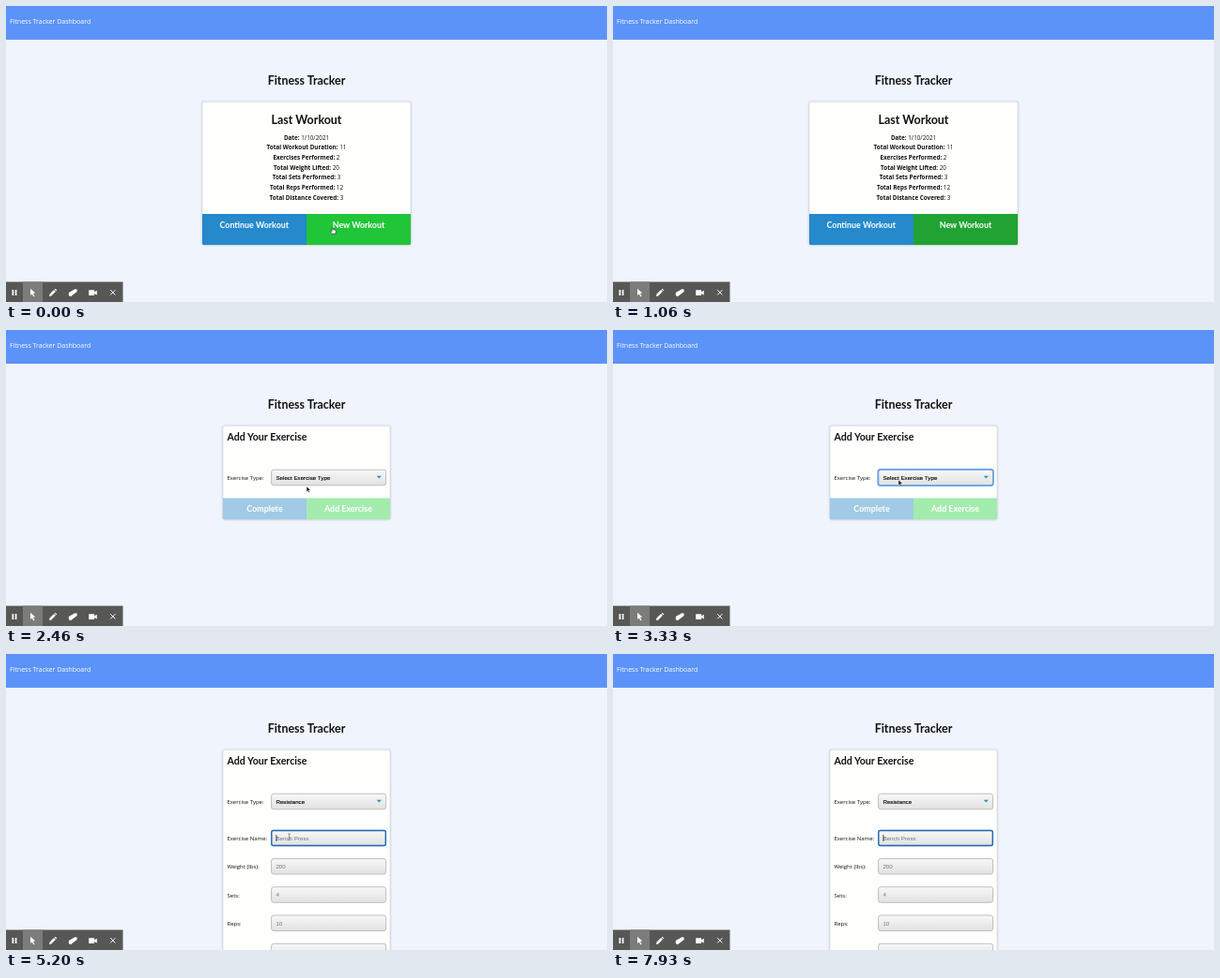
These frames come from a looping animation (640x316 px, 8000 ms). An HTML page:

```html
<!DOCTYPE html>
<html lang="en">
<head>
<meta charset="utf-8">
<title>Fitness Tracker</title>
<style>
  html, body { margin: 0; width: 100%; height: 100%; overflow: hidden; background: #f0f4fc; }
  svg { display: block; width: 100vw; height: 100vh; }
  text { font: 6px "Open Sans", "Noto Sans", sans-serif; fill: #111; white-space: pre; }
  .mid { text-anchor: middle; }
  .row { font-size: 6.3px; }
  .row tspan { font-weight: 700; }
  .h1, .h2, .btn { font: 700 12.44px Lato, sans-serif; }
  .h2 { font-size: 10.66px; }
  .btn { font-size: 8.89px; fill: #fff; }
  .field { font: 6.22px "Liberation Sans", Arial, sans-serif; fill: #757575; }
  .pick { fill: #000; stroke: #000; stroke-width: .12px; }
  .card { fill: #fefffd; stroke: #d3d6da; stroke-width: .6px; filter: drop-shadow(0 .7px .8px #0003); }
  .box { fill: url(#shade); stroke: #b0b0b0; stroke-width: .8px; }
  .ring { fill: none; stroke: #64a4e6; stroke-width: 1.8px; }
  .edge { fill: none; stroke: #1c69b8; stroke-width: 1.4px; }
</style>
</head>
<body>
<svg viewBox="0 0 640 316" preserveAspectRatio="none">
  <defs>
    <linearGradient id="shade" x2="0" y2="1">
      <stop stop-color="#f8f8f8"/><stop offset="1" stop-color="#e0e1e0"/>
    </linearGradient>
  </defs>
  <rect width="640" height="316" fill="#f0f4fc"/>
  <rect width="640" height="36" fill="#5b93f8"/>
  <text x="4" y="18.7" style="font-size:7px;fill:#fff">Fitness Tracker Dashboard</text>
  <text class="h1 mid" x="320" y="84">Fitness Tracker</text>

  <g id="last">
    <rect class="card" x="209" y="102.3" width="222" height="152.7" rx="2"/>
    <text class="h1 mid" x="320" y="126">Last Workout</text>
    <g id="stats"></g>
    <path d="M209 222h111v33h-109.5q-1.500 0-1.500-1.500z" fill="#2589cc"/>
    <path id="start" d="M320 222h111v31.500q0 1.500-1.500 1.500h-109.500z"/>
    <text class="btn mid" x="264.3" y="237">Continue Workout</text>
    <text class="btn mid" x="375.5" y="237">New Workout</text>
  </g>

  <g id="add">
    <rect id="sheet" class="card" x="231" y="102.3" width="178" rx="2"/>
    <text class="h2" x="235.500" y="117.500">Add Your Exercise</text>
    <text x="235.500" y="159.600">Exercise Type:</text>
    <rect class="box" x="282.600" y="149.200" width="122" height="16.600" rx="2.500"/>
    <text id="type" class="field pick" x="287.400" y="159.600"></text>
    <path d="M394.700 155.700h5.200l-2.600 2.900z" fill="#2493c4"/>
    <rect id="typeRing" class="ring" x="282.300" y="148.900" width="122.600" height="17.200" rx="2.500"/>
    <g id="actions">
      <path d="M231 179.500h89v22.700h-87.500q-1.500 0-1.500-1.500z" fill="#a1cae6"/>
      <path d="M320 179.500h89v21.200q0 1.500-1.500 1.500h-87.500z" fill="#a3ecad"/>
      <text class="btn mid" x="275.500" y="194.200">Complete</text>
      <text class="btn mid" x="364.500" y="194.200">Add Exercise</text>
    </g>
    <g id="fields"></g>
    <g id="nameFocus">
      <rect class="edge" x="282.800" y="188.500" width="121.500" height="16" rx="1.500"/>
      <path id="caret" d="M287.900 193v7" stroke="#111" stroke-width=".7"/>
    </g>
  </g>

  <rect y="294.500" width="124.500" height="21.500" fill="#575755"/>
  <rect x="18" y="294.500" width="21" height="21.500" fill="#7c7c7a"/>
  <g fill="#fff">
    <path d="M6.500 303h1.700v6h-1.700zM9.700 303h1.700v6h-1.700z"/>
    <path d="M26 301.800l5.300 4.600-2.400.3 1.500 3-1.300.6-1.400-3-1.700 1.600z"/>
    <path d="M46 309.900l.5-2.300 4.600-4.600 1.800 1.800-4.600 4.600zM51.700 302.400l.8-.7 1.800 1.800-.8.700z"/>
    <path d="M66.800 306l6.500-3.700 2.300.1v2.700l-6.500 4.900-2.300-.7z"/>
    <path d="M88.200 303.300h5.900v1.900l2.700-1.500v4.800l-2.700-1.500v1.900h-5.900z"/>
    <path d="M111.200 303.200l5.200 5.200m0-5.200l-5.200 5.200" stroke="#fff" stroke-width="1"/>
  </g>

  <g id="cursor">
    <path id="hand" d="M-.7-3q.8-.7 1.200.3v1.500l2.400.5q.7.300.5 1.300l-.6 2.700h-3.600l-2-2.600q.2-1 1.200-.4l.6.500z" fill="#fff" stroke="#222" stroke-width=".6"/>
    <path id="arrow" d="M0 0v5.600l1.300-1.200.9 2 1-.5-.9-1.900h1.800z" fill="#111" stroke="#fff" stroke-width=".35"/>
    <path id="beam" d="M-1.300-3.500q1.300 0 1.300 1v5q0 1-1.300 1m2.600-7q-1.300 0-1.300 1m0 5q0 1 1.300 1" fill="none" stroke="#555" stroke-width=".6"/>
  </g>
</svg>
<script>
const $ = id => document.getElementById(id);
const show = (id, on) => $(id).style.display = on ? "" : "none";

$("stats").innerHTML = [
  ["Date", "1/10/2021"], ["Total Workout Duration", 11], ["Exercises Performed", 2],
  ["Total Weight Lifted", 20], ["Total Sets Performed", 3],
  ["Total Reps Performed", 12], ["Total Distance Covered", 3]
].map(([name, value], i) =>
  `<text class="row mid" x="320" y="${142.7 + i * 10.67}"><tspan>${name}</tspan><tspan style="font-weight:700">:</tspan> ${value}</text>`
).join("");

$("fields").innerHTML = [
  ["Exercise Name:", "Bench Press"], ["Weight (lbs):", 200], ["Sets:", 4], ["Reps:", 10], ["Duration:", ""]
].map(([label, hint], i) => {
  const y = 188.2 + i * 30.25;
  return `<text x="235.5" y="${y + 10.9}">${label}</text>
    <rect class="box" x="282.6" y="${y}" width="122" height="16.6" rx="2.5"/>
    <text class="field" x="287.4" y="${y + 10.6}">${hint}</text>`;
}).join("");

// Pointer path: time, x, y
const path = [
  [0, 348, 240], [60, 348, 240], [860, 356, 239], [1860, 343, 181], [2200, 325, 168],
  [2400, 325, 168], [2600, 309, 165], [3000, 309, 165], [3330, 304, 160], [3930, 304, 160],
  [4000, 306.7, 168.5], [4600, 304, 192], [4800, 304, 193], [5200, 301.6, 195.2], [8000, 301.6, 195.2]
];

function pointer(t) {
  const i = path.findIndex(p => p[0] > t);
  const [t0, x0, y0] = path[i - 1], [t1, x1, y1] = path[i];
  const k = (t - t0) / (t1 - t0);
  return `translate(${x0 + (x1 - x0) * k} ${y0 + (y1 - y0) * k})`;
}

function draw(now) {
  const t = now % 8000;
  const onAdd = t >= 1400, resistance = t >= 3930, naming = t >= 4930;

  show("last", !onAdd);
  show("add", onAdd);
  const press = Math.min(1, Math.max(0, (t - 900) / 130));
  $("start").setAttribute("fill", `rgb(32 ${197 - 34 * press} ${56 - 5 * press})`);

  $("sheet").setAttribute("height", resistance ? 260 : 100);
  $("type").textContent = resistance ? "Resistance" : "Select Exercise Type";
  show("typeRing", t >= 3000 && !naming);
  show("actions", !resistance);
  show("fields", resistance);
  show("nameFocus", naming);
  show("caret", Math.floor((t - 4930) / 500) % 2 === 0);

  show("cursor", t < 930 || t >= 1860 && t < 7660);
  show("hand", !onAdd);
  show("arrow", onAdd && t < 4400);
  show("beam", t >= 4400);
  $("cursor").setAttribute("transform", pointer(t));
  requestAnimationFrame(() => draw(performance.now() - start));
}
const start = performance.now();
draw(0);
</script>
</body>
</html>
```
